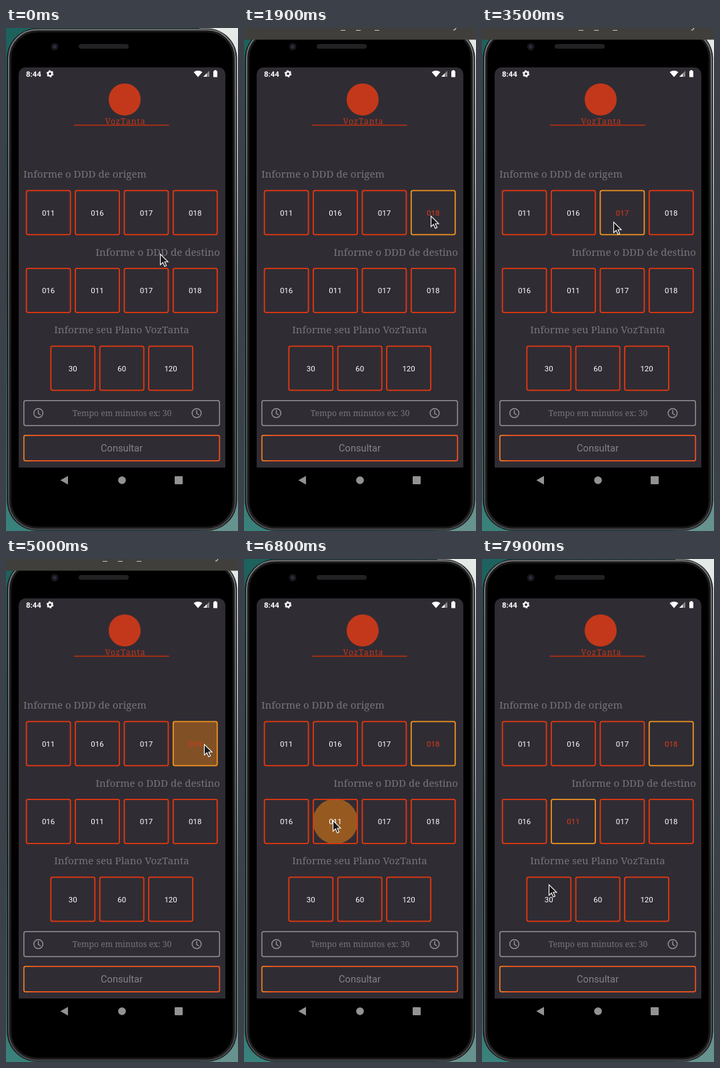
Recreate the animation shown at these times as an HTML page. Size 348x753 px, loop 8 s.

```html
<!DOCTYPE html>
<html lang="pt">
<head>
<meta charset="utf-8">
<style>
  html, body { margin: 0; width: 100%; height: 100%; overflow: hidden; background: #000; }
  svg { display: block; width: 348px; height: 753px; }
  text { font-family: Roboto, sans-serif; }
  .slab { font-family: "Noto Serif", serif; font-weight: 300; fill: #77747a; }
  .label { font-size: 15.1px; }
  .mid { text-anchor: middle; }
  .end { text-anchor: end; }
  .tile rect { fill: none; stroke: #e5380e; stroke-width: 1.8; }
  .tile text { fill: #fff; font-size: 11.5px; text-anchor: middle; }
  .tile.on rect { stroke: #ee931f; }
  .tile.on text { fill: #dc3a18; }
  .clock { fill: none; stroke: #929095; stroke-width: 1.5; stroke-linecap: round; }
</style>
</head>
<body>
<svg viewBox="0 0 348 753">
  <defs>
    <linearGradient id="sea" x2="0" y2="1">
      <stop offset="0" stop-color="#1d625e"/>
      <stop offset=".5" stop-color="#2c4f50"/>
      <stop offset="1" stop-color="#3a827c"/>
    </linearGradient>
    <linearGradient id="foam" x2="0" y2="1">
      <stop offset="0" stop-color="#e6ebe8"/>
      <stop offset=".3" stop-color="#c3cdca"/>
      <stop offset=".7" stop-color="#5f8582"/>
      <stop offset="1" stop-color="#67938f"/>
    </linearGradient>
    <linearGradient id="rim" x2="0" y2="1">
      <stop offset="0" stop-color="#77777a"/>
      <stop offset=".5" stop-color="#5c5c5f"/>
      <stop offset="1" stop-color="#4c4c4f"/>
    </linearGradient>
    <linearGradient id="edge">
      <stop offset="0" stop-color="#f07f1f"/>
      <stop offset=".06" stop-color="#f0551e"/>
      <stop offset="1" stop-color="#f0551e"/>
    </linearGradient>
    <clipPath id="clip"><rect id="clipBox" width="66" height="66" rx="2.5"/></clipPath>
  </defs>

  <rect width="348" height="753" fill="url(#sea)"/>
  <rect x="290" width="58" height="753" fill="url(#foam)"/>
  <rect x="1.500" y=".5" width="345" height="752" rx="45" fill="#101011"/>
  <rect x="4" y="2.500" width="340" height="748" rx="42.500" fill="#1b1b1c" stroke="url(#rim)" stroke-width="2"/>
  <rect x="8" y="6.500" width="332" height="740" rx="38.500" fill="#000"/>
  <rect x="109" y="24" width="75" height="7" rx="3.5" fill="#222224"/>
  <circle cx="73" cy="28" r="5.5" fill="#18181c"/>
  <circle cx="73" cy="28" r="2.5" fill="#2d2d3d"/>
  <path d="M19 658V69a10 10 0 0 1 10-10H319a10 10 0 0 1 10 10V658Z" fill="#302c34"/>

  <text x="30" y="72.500" font-size="11.4" font-weight="600" fill="#fff">8:44</text>
  <circle cx="66" cy="68.500" r="3.100" fill="none" stroke="#fff" stroke-width="2.400"/>
  <circle cx="66" cy="68.500" r="4.600" fill="none" stroke="#fff" stroke-width="1.400" stroke-dasharray="2.400 2.417"/>
  <path d="M281.500 66q6.500-4.500 13 0L288 73.500Z" fill="#fff"/>
  <path d="M305 64V73H296Z" fill="#87848a"/>
  <path d="M301 68V73H296Z" fill="#fff"/>
  <path d="M311 64.500h1.500V63h3v1.500H317V73.500H311Z" fill="#fff"/>

  <circle cx="178" cy="107" r="24" fill="#c3381a"/>
  <text class="mid" x="179" y="144" font-size="12" letter-spacing="1" fill="#c3381a"
        style="font-family:'Noto Serif',serif">VozTanta</text>
  <path d="M102 145.500H244.500" stroke="#c3300f" stroke-width="1.300"/>

  <text class="slab label" x="26" y="224">Informe o DDD de origem</text>
  <text class="slab label end" x="321" y="341">Informe o DDD de destino</text>
  <text class="slab label mid" x="173.500" y="457">Informe seu Plano VozTanta</text>

  <g clip-path="url(#clip)"><circle id="ripple" fill="#f08212"/></g>
  <g id="tiles"></g>

  <rect x="26.800" y="557.800" width="293.500" height="37.500" rx="3" fill="none" stroke="#929095" stroke-width="1.500"/>
  <text class="slab mid" x="174" y="581" font-size="12.2">Tempo em minutos ex: 30</text>
  <g class="clock"><circle cx="48.500" cy="576.500" r="6.800"/><path d="M48.500 572.500v4.500l3 2"/></g>
  <g class="clock"><circle cx="286" cy="576.500" r="6.800"/><path d="M286 572.500v4.500l3 2"/></g>
  <rect x="26.800" y="609.800" width="293.500" height="38" rx="2.500" fill="none" stroke="url(#edge)" stroke-width="1.700"/>
  <text class="mid" x="173.500" y="634" font-size="14.7" fill="#858288">Consultar</text>

  <g fill="#929292">
    <path d="M81.500 677 93 670.500V683.500Z"/>
    <circle cx="174" cy="677" r="5.800"/>
    <rect x="253" y="671" width="12" height="12" rx="1"/>
  </g>

  <g id="bar">
    <rect width="348" height="17.500" fill="#403f3b"/>
    <path d="M145 3.500h7M168 3.500h7M196 3.500h7" stroke="#c9c7c2"/>
    <path d="M318 0q-1.500 3.500-4 3" fill="none" stroke="#c9c7c2" stroke-width="1.300"/>
  </g>
  <path id="cursor" d="M.5.5V16.500L4.300 13 7 19 9.600 17.800 7 12H12Z" fill="#18181b" stroke="#fff" stroke-width="1.100"/>
</svg>
<script>
const LOOP = 8000, STEP = 100, SIZE = 66, PITCH = 73.4;
const byId = id => document.getElementById(id);

const rows = [
  { x: 30.6, y: 243.3, names: ["011", "016", "017", "018"] },
  { x: 30.6, y: 359.8, names: ["016", "011", "017", "018"] },
  { x: 67.3, y: 476.3, names: ["30", "60", "120"] }
];

function add(parent, name, attrs) {
  const node = document.createElementNS("http://www.w3.org/2000/svg", name);
  for (const key in attrs) node.setAttribute(key, attrs[key]);
  return parent.appendChild(node);
}

const tiles = rows.map(({ x, y, names }) => names.map((name, i) => {
  const left = x + i * PITCH;
  const node = add(byId("tiles"), "g", { class: "tile" });
  add(node, "rect", { x: left, y, width: SIZE, height: SIZE, rx: 2.5 });
  add(node, "text", { x: left + SIZE / 2, y: y + 37.5 }).textContent = name;
  return { node, left, top: y };
}));

// Pointer tip: time, x, y
const path = [
  [0, 231, 338], [100, 231, 338], [200, 226, 320], [400, 226, 320],
  [500, 242, 296], [600, 242, 296], [1000, 280, 281], [1900, 280, 281],
  [2200, 305, 291], [2300, 305, 291], [2800, 197, 290], [4000, 197, 290],
  [4300, 292, 282], [4400, 292, 282], [4500, 302, 279], [4600, 297, 277],
  [5200, 297, 277], [5500, 157, 354], [5600, 157, 354], [5800, 131, 387],
  [5900, 131, 387], [6000, 133, 391], [7200, 133, 391], [7600, 114, 439],
  [7900, 100, 487]
];

const fade = [.53, .42, .28, .14];
const clicks = [
  { at: 1500, row: 0, col: 3, alpha: [.53, .42, .42, .42] },
  { at: 3100, row: 0, col: 2, alpha: fade },
  { at: 4900, row: 0, col: 3, alpha: fade },
  { at: 6800, row: 1, col: 1, alpha: fade }
];

function pointAt(t) {
  const i = path.findIndex(key => key[0] >= t);
  const b = path[i], a = path[Math.max(0, i - 1)];
  const k = b[0] > a[0] ? (t - a[0]) / (b[0] - a[0]) : 0;
  return [1, 2].map(n => a[n] + (b[n] - a[n]) * k);
}

function drawRipple(t) {
  const click = clicks.find(c => t >= c.at && t < c.at + 400);
  const ripple = byId("ripple");
  ripple.setAttribute("opacity", click ? click.alpha[(t - click.at) / STEP] : 0);
  if (!click) return;
  const { left, top } = tiles[click.row][click.col];
  byId("clipBox").setAttribute("x", left);
  byId("clipBox").setAttribute("y", top);
  ripple.setAttribute("cx", left + SIZE / 2);
  ripple.setAttribute("cy", top + SIZE / 2);
  ripple.setAttribute("r", t === click.at ? 33.8 : 50);
}

function draw(time) {
  const t = Math.floor((time % LOOP) / STEP) * STEP;
  const chosen = rows.map((_, row) =>
    clicks.filter(c => c.row === row && t >= c.at + STEP).pop()?.col);
  tiles.forEach((row, r) => row.forEach((tile, c) =>
    tile.node.classList.toggle("on", chosen[r] === c)));
  drawRipple(t);
  byId("bar").setAttribute("visibility", t >= 1100 && t < 5200 ? "visible" : "hidden");
  byId("cursor").setAttribute("transform", `translate(${pointAt(t)})`);
}

const start = performance.now();
function tick() {
  draw(performance.now() - start);
  requestAnimationFrame(tick);
}
tick();
</script>
</body>
</html>
```
